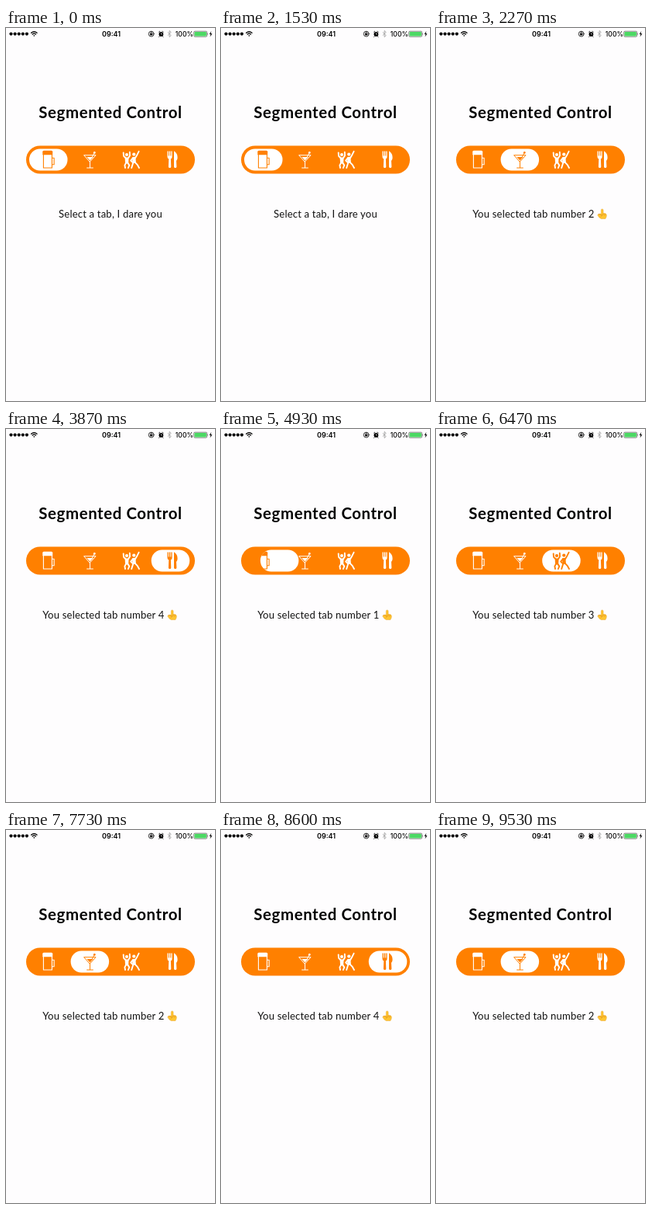
An HTML page that plays this animation: 270x480 px, repeating every 9.67 s.

```html
<!DOCTYPE html>
<html lang="en">
<head>
<meta charset="utf-8">
<title>Segmented Control</title>
<style>
  html, body { margin: 0; width: 100%; height: 100%; overflow: hidden; background: #fefdfe; }
  svg { display: block; width: 100vw; height: 100vh; }
  .status { font: 500 8.6px Inter, Roboto, sans-serif; }
  .clock { font-size: 9px; font-weight: 600; }
  .title { font: 700 20.4px Lato, "Open Sans", sans-serif; letter-spacing: .6px; text-anchor: middle; }
  .label { font: 400 13.1px Lato, "Open Sans", sans-serif; letter-spacing: .18px; fill: #111; }
  .line { fill: none; stroke: currentColor; stroke-linecap: round; stroke-linejoin: round; }
  .icon { color: #fff; }
  .icon.selected, .covered { color: #ff8000; }
</style>
</head>
<body>
<svg viewBox="0 0 270 480" xmlns="http://www.w3.org/2000/svg">
  <defs>
    <clipPath id="pillClip"><rect class="pill" x="30" y="155.5" width="49.5" height="28" rx="14"/></clipPath>
    <g id="beer" fill="currentColor">
      <path d="M47.3 159.2q0-1.5 1.5-1.5h9.9q1.5 0 1.5 1.5v4H47.3z"/>
      <path class="line" stroke-width="1.1" d="M48.4 162.5v17.5h11v-17.5M59.8 167.2h2.3v8.6h-2.3"/>
    </g>
    <g id="cocktail" fill="currentColor">
      <path class="line" stroke-width="1" d="M101 163.7h15l-7.5 8.2zM108.5 172v7.6M104.6 180h7.8M111.2 166l2.8-5"/>
      <path d="M104.4 166h8.2l-4.1 4.6z"/>
      <circle cx="114.3" cy="160.4" r="1.4"/>
    </g>
    <g id="dancers" fill="currentColor">
      <circle cx="156" cy="163" r="2.1"/>
      <circle cx="165.3" cy="162.6" r="2.1"/>
      <path class="line" stroke-width="1.9" d="M151.7 160.4l.3 4.4 2.6 2.4M159.8 159.8l.2 4.4-2 3M155 173.6l-1.6 3 .6 3.4M157.3 173.6l2 3-1.4 3.4M167 167.2l2.4-4 2.2-4.4M163.6 167.6l-2.4 3 1.8 1.8M164.4 173l-2.2 7M166.7 172.8l2.9 3 2.4 4.2"/>
      <path d="M153.6 166.4h5l-.5 8h-4zM163 166.2l4.4-.4.5 7.6-4.4.6z"/>
    </g>
    <g id="cutlery" fill="currentColor">
      <path d="M208.5 158.5h1.3v6h1v-6h1.5v6h1v-6h1.3v7.3q0 2-1.7 2.6l.4 10q0 1.6-1.7 1.6t-1.7-1.6l.4-10q-1.8-.6-1.8-2.6z"/>
      <path d="M217 158.3q4.8 3 4.6 8.6-.1 2.9-1.6 4.2l.4 7.4q0 1.5-1.7 1.5t-1.7-1.5z"/>
    </g>
  </defs>

  <g><circle cx="6.5" cy="7.6" r="2.1"/><circle cx="11.6" cy="7.6" r="2.1"/><circle cx="16.7" cy="7.6" r="2.1"/><circle cx="21.8" cy="7.6" r="2.1"/><circle cx="26.9" cy="7.6" r="2.1"/></g>
  <g class="line" stroke-width="1.3">
    <path d="M32.6 6.3q3.7-3.2 7.4 0M34.1 8.1q2.2-1.8 4.4 0"/>
    <path d="M36.3 9.8v.2" stroke-width="1.6"/>
  </g>
  <text class="status clock" x="124" y="10.8">09:41</text>
  <g class="line" stroke-width=".8">
    <circle cx="187.7" cy="7.6" r="3.4"/>
    <path d="M186.7 7V6.2a1 1 0 0 1 2 0V7"/>
    <path d="M197.5 5.2l1.2-1M203.2 5.2l-1.2-1M198.3 10.8l-.7.7M202.4 10.8l.7.7"/>
  </g>
  <rect x="186.1" y="7" width="3.2" height="2.4"/>
  <circle cx="200.4" cy="7.9" r="2.9"/>
  <path d="M200.4 6.2v1.9h1.4" fill="none" stroke="#fff" stroke-width=".6"/>
  <path d="M209 5.4l4.2 4.2-2.1 2V3.4l2.1 2L209 9.6" fill="none" stroke="#999" stroke-width=".8"/>
  <text class="status" x="218.8" y="10.8">100%</text>
  <rect x="242.7" y="4.2" width="17" height="7" rx="1.4" fill="none" stroke="#333" stroke-width=".6"/>
  <rect x="243.5" y="5" width="15.4" height="5.4" rx=".8" fill="#4cd964"/>
  <path d="M260.4 6.5q1.2 1.2 0 2.4z" fill="#333"/>
  <path d="M265.3 4l-2.6 4.1h1.7l-.8 3.3 2.8-4.2h-1.8z"/>

  <text class="title" x="135" y="115.5">Segmented Control</text>

  <rect x="26" y="151.5" width="218" height="36" rx="18" fill="#ff8000"/>
  <use class="icon" href="#beer"/>
  <use class="icon" href="#cocktail"/>
  <use class="icon" href="#dancers"/>
  <use class="icon" href="#cutlery"/>
  <rect class="pill" x="30" y="155.5" width="49.5" height="28" rx="14" fill="#fff"/>
  <g class="covered" clip-path="url(#pillClip)">
    <use href="#beer"/><use href="#cocktail"/><use href="#dancers"/><use href="#cutlery"/>
  </g>

  <text class="label" id="prompt" x="135" y="244.4" text-anchor="middle">Select a tab, I dare you</text>
  <g id="result" visibility="hidden">
    <text class="label" x="47.2" y="244.4">You selected tab number <tspan id="number">2</tspan></text>
    <path d="M213.3 239v-4.6q0-1.5 1.4-1.5t1.4 1.5v4l2.6.3q1.7.4 1.7 2.2 0 2.6-1.5 4.6h-5.6q-2.6-1-4.3-4.2-.5-1.5 1-1.9z" fill="#ffc531" stroke="#e59a1f" stroke-width=".4"/>
    <path d="M210.3 239.6l4.6 1.2-2 1.9M216.1 238.6l-.2 2M218.2 239l-.2 2.2" fill="none" stroke="#d98518" stroke-width=".6" stroke-linecap="round"/>
  </g>
</svg>

<script>
  const LOOP = 9670, FIRST_X = 30, STEP = 53.6;
  // The selection switches at the given share of each move: at once for a tap, on release for a drag.
  const moves = [
    { start: 1930, end: 2270, tab: 2, release: 0 },
    { start: 2600, end: 3470, tab: 4, release: .7 },
    { start: 3830, end: 4330, tab: 1, release: .7 },
    { start: 4680, end: 5270, tab: 2, release: .7 },
    { start: 5730, end: 6470, tab: 3, release: .7 },
    { start: 6730, end: 7330, tab: 2, release: .7 },
    { start: 7730, end: 8600, tab: 4, release: .7 },
    { start: 8800, end: 9530, tab: 2, release: .7 }
  ];
  const pills = document.querySelectorAll('.pill');
  const icons = document.querySelectorAll('.icon');
  const prompt = document.getElementById('prompt');
  const result = document.getElementById('result');
  const number = document.getElementById('number');
  const ease = p => p * p * (3 - 2 * p);
  const show = (node, on) => node.setAttribute('visibility', on ? 'visible' : 'hidden');

  function draw(time) {
    let position = 1, selected = 1;
    for (const { start, end, tab, release } of moves) {
      if (time < start) break;
      const p = Math.min(1, (time - start) / (end - start));
      position += (tab - position) * ease(p);
      if (p >= release) selected = tab;
    }
    const x = FIRST_X + (position - 1) * STEP;
    pills.forEach(pill => pill.setAttribute('x', x.toFixed(2)));
    icons.forEach((icon, i) => icon.classList.toggle('selected', i + 1 === selected));
    const touched = time >= moves[0].start;
    show(prompt, !touched);
    show(result, touched);
    number.textContent = selected;
  }

  const origin = performance.now();
  function frame() {
    draw((performance.now() - origin) % LOOP);
    requestAnimationFrame(frame);
  }
  frame();
</script>
</body>
</html>
```
